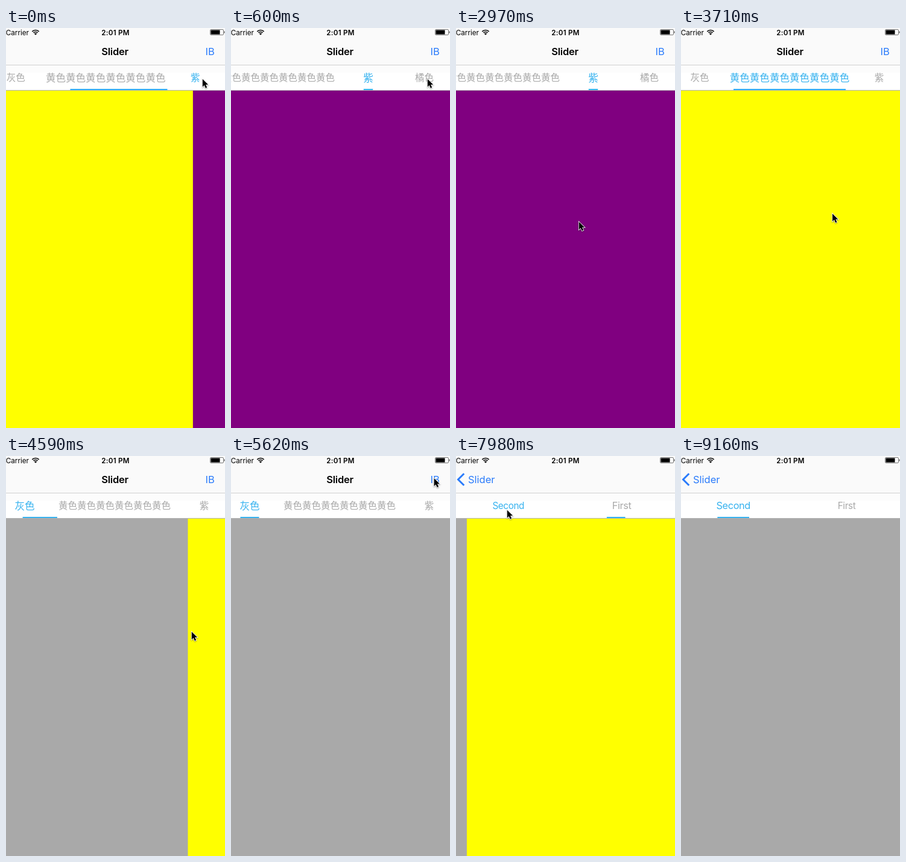
An HTML page with a canvas that plays this animation: 363x664 px, repeating every 9.31 s.

```html
<!DOCTYPE html>
<html lang="zh">
<head>
<meta charset="utf-8">
<style>
  html, body { margin: 0; width: 100%; height: 100%; overflow: hidden; background: #fff; }
  canvas { display: block; }
</style>
</head>
<body>
<canvas id="stage" width="363" height="664"></canvas>
<script>
const ctx = document.getElementById('stage').getContext('2d');
const W = 363, H = 664, LOOP = 9310, STEP = 147.7;
const GRAY = '#a9a9a9', YELLOW = '#ffff00', ACCENT = '#36b2ef', LINK = '#2a7bfb';
const SANS = 'Inter, "Noto Sans CJK SC", sans-serif';
const CJK = '"Noto Sans CJK SC", "Noto Sans CJK", sans-serif';

const clamp = u => Math.min(1, Math.max(0, u));
const mix = (a, b, u) => a + (b - a) * u;
const ease = u => Math.sin(clamp(u) * Math.PI / 2) ** 2;

// Each gesture goes from 0 to 1 over the time since it began.
const swipe = age => ease(age / 549);
const tap = age => ease(age / 300);
const tapAtOnce = age => age >= 0 ? 1 : 0;
const push = age => Math.sin(clamp(age / 370) * Math.PI / 2);

const colours = {
  font: CJK, size: 15.5, spacing: 0, scroll: 101,
  labels: ['灰色', '黄色'.repeat(6), '紫', '橘色'],
  centres: [31, 180, 328.5, 421.5],
  fills: [GRAY, YELLOW, '#800080', '#fa8206'],
  page(t, tapped) {
    const back = [0, 1, 2].reduce((sum, k) => sum + swipe(t - 2000 - 1089 * k), 0);
    return 1 + tapped(t + 75) + tapped(t - 740) - back;
  }
};
const pair = {
  font: SANS, size: 15.3, spacing: -0.4, scroll: 0,
  labels: ['Second', 'First'],
  centres: [86.7, 274.5],
  fills: [GRAY, YELLOW],
  page: (t, tapped) => swipe(t - 6850) - tapped(t - 7933)
};

// Pointer stops: time, x, y
const stops = [
  [1200, 325, 84], [1625, 260, 184], [2954, 203, 321], [4579, 307, 291], [5600, 337, 34],
  [6794, 226, 250], [7700, 84, 89], [8430, 84, 89], [9010, 316, 627]
];

function rect(x, y, w, h, fill) {
  ctx.fillStyle = fill;
  ctx.fillRect(x, y, w, h);
}

function setFont(size, { font = SANS, weight = 400, spacing = 0 } = {}) {
  ctx.font = `${weight} ${size}px ${font}`;
  ctx.letterSpacing = spacing + 'px';
}

function text(str, x, y, size, fill, style = {}) {
  setFont(size, style);
  ctx.textAlign = style.align || 'left';
  ctx.fillStyle = fill;
  ctx.fillText(str, x, y);
}

function drawScreen(screen, t, shift) {
  const { labels, centres, fills, size, font, spacing } = screen;
  const page = screen.page(t, tap);
  const active = Math.round(screen.page(t, tapAtOnce));
  const left = Math.floor(page), right = Math.min(left + 1, labels.length - 1);
  const part = page - left;
  ctx.save();
  ctx.translate(shift, 0);

  rect(0, 103, W, H, fills[right]);
  rect(0, 103, W * (1 - part), H, fills[left]);
  rect(0, 62, W, 12, '#fcfcfc');
  rect(0, 74, W, 29, '#fff');
  rect(0, 103, W, 1, '#b2b2b2');

  ctx.translate(-screen.scroll * clamp(page - 1), 0);
  labels.forEach((label, i) => {
    const s = size * (i === Math.round(page) ? 1.068 : 1);
    text(label, centres[i], 82.4 + s * 0.37, s, i === active ? ACCENT : GRAY,
      { align: 'center', font, spacing });
  });

  setFont(size, { font, spacing });
  const widthOf = i => ctx.measureText(labels[i]).width;
  const width = mix(widthOf(left), widthOf(right), part);
  rect(mix(centres[left], centres[right], part) - width / 2, 101, width, 2, ACCENT);
  ctx.restore();
}

function drawNav(q) {
  rect(0, 0, W, 61, '#fafafa');
  rect(0, 61, W, 1, '#cfcfcf');
  ctx.globalAlpha = 1 - q;
  text('Slider', mix(180.5, 42, q), 45, 16.5, '#000', { align: 'center', weight: 600, spacing: -0.25 });
  text('IB', 330.5, 45, 16.5, LINK);
  ctx.globalAlpha = q;
  text('Slider', mix(158, 20, q), 45, 16.5, LINK);
  ctx.strokeStyle = LINK;
  ctx.lineWidth = 3;
  ctx.stroke(new Path2D('M13.3 29.2L3.5 39L13.3 48.8'));
  ctx.globalAlpha = 1;
}

function drawStatus() {
  text('Carrier', 38, 11.5, 11.7, '#000', { align: 'right' });
  text('2:01 PM', 181.5, 11.5, 11.6, '#000', { align: 'center', weight: 600, spacing: 0.3 });
  ctx.strokeStyle = '#000';
  ctx.lineWidth = 1.7;
  for (const r of [8, 5]) {
    ctx.beginPath();
    ctx.arc(49, 11.5, r, -Math.PI * 0.75, -Math.PI * 0.25);
    ctx.stroke();
  }
  ctx.fillStyle = '#000';
  ctx.fill(new Path2D('M49 11.8L46.7 9.3Q49 7.6 51.3 9.3Z'));
  ctx.lineWidth = 1;
  ctx.strokeStyle = '#777';
  ctx.beginPath();
  ctx.roundRect(338.5, 2.5, 22, 9, 1.5);
  ctx.stroke();
  rect(339.5, 3.5, 15, 7, '#000');
  rect(361.5, 5.5, 1.2, 3, '#555');
}

function drawPointer(t) {
  if (t > 9100) return;
  const next = stops.findIndex(stop => stop[0] > t);
  const i = next < 0 ? stops.length - 1 : Math.max(1, next);
  const [t0, x0, y0] = stops[i - 1], [t1, x1, y1] = stops[i];
  const u = clamp((t - t0) / (t1 - t0));
  const arrow = new Path2D('M0 0V14.6L3.3 11.5L5.7 17L8.4 15.9L6 10.5H10.5Z');
  ctx.save();
  ctx.translate(mix(x0, x1, u) + 0.8, mix(y0, y1, u) + 0.8);
  ctx.scale(0.88, 0.88);
  ctx.shadowColor = 'rgba(0,0,0,.4)';
  ctx.shadowBlur = 2;
  ctx.shadowOffsetY = 1;
  ctx.lineWidth = 1.8;
  ctx.strokeStyle = '#fff';
  ctx.stroke(arrow);
  ctx.shadowColor = 'transparent';
  ctx.fillStyle = '#000';
  ctx.fill(arrow);
  ctx.restore();
}

function frame(now) {
  // The picture advances in even, held steps.
  const t = Math.floor((now % LOOP) / STEP) * STEP;
  const q = push(t - 5760);
  rect(0, 0, W, H, '#fff');
  if (q < 1) drawScreen(colours, t, -0.3 * W * q);
  if (q > 0) drawScreen(pair, t, W * (1 - q));
  drawNav(q);
  drawStatus();
  drawPointer(t);
  requestAnimationFrame(frame);
}
requestAnimationFrame(frame);
</script>
</body>
</html>
```
